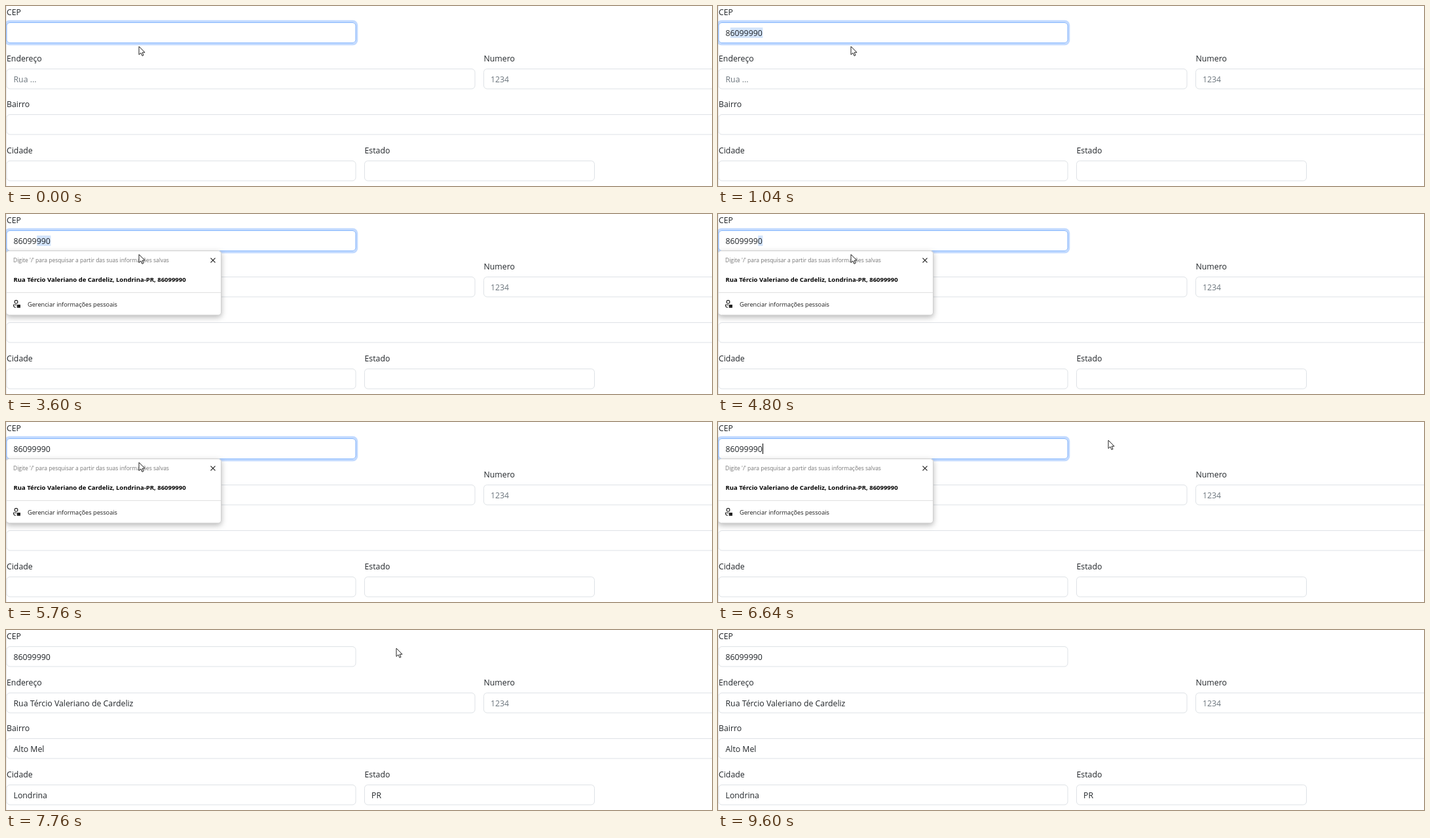
Write an HTML page that moves like this. It is 1078 px wide and 276 px high and loops after 9.68 s.

```html
<!DOCTYPE html>
<html lang="pt-BR">
<head>
<meta charset="utf-8">
<title>Busca de CEP</title>
<style>
  html, body { margin: 0; height: 100%; overflow: hidden; background: #fff; }
  svg { display: block; width: 100%; height: 100%; }
  text { font: 12.3px "Open Sans", "Noto Sans", sans-serif; fill: #212529; }
  .hint { fill: #6c757d; }
  .box { fill: #fff; stroke: #dee2e6; }
  #popup rect { fill: #fff; stroke: #d0d0d0; filter: drop-shadow(0 3px 4px rgba(0, 0, 0, .28)); }
  #popup .tip { font-size: 8.47px; fill: #767676; }
  #popup .saved { font-size: 9.5px; font-weight: 700; fill: #000; }
  #popup .manage { font-size: 9.2px; fill: #1b1b1b; }
</style>
</head>
<body>
<svg viewBox="0 0 1078 276">
  <path d="M.5 0V276" stroke="#e6e6e6"/>
  <g id="form"></g>
  <g id="focus">
    <rect x="-.6" y="23.4" width="536.2" height="35.2" rx="6" fill="none" stroke="#0d6efd" stroke-opacity=".25" stroke-width="3.4"/>
    <rect x="1" y="25.5" width="533" height="31" rx="5" fill="#fff" stroke="#86b7fe"/>
  </g>
  <rect id="selection" y="33" height="16" fill="#d3e4fa"/>
  <text id="cep" x="11.5" y="46"></text>
  <path id="caret" d="M68.5 33V49" stroke="#000"/>
  <g id="popup">
    <rect x=".5" y="56.5" width="328" height="98.5" rx="4"/>
    <text class="tip" x="11" y="74">Digite '/' para pesquisar a partir das suas informações salvas</text>
    <path d="M312.5 67.5l7 7m0-7l-7 7" stroke="#333" stroke-width="1.1"/>
    <text class="saved" x="11.5" y="104"></text>
    <path d="M1 120.5H328" stroke="#e0e0e0"/>
    <g fill="none" stroke="#222" stroke-width="1.1">
      <circle cx="15.5" cy="134.8" r="2.4"/>
      <path d="M15 143.3c-3 0-3.6-1.4-3.6-4h4.6"/>
      <path d="M17.2 139.6h4.2v3.6h-4.2z" fill="#222"/>
    </g>
    <text class="manage" x="33" y="142">Gerenciar informações pessoais</text>
  </g>
  <path id="mouse" d="M0 0V12.6L3 9.9L5 14.4L7 13.5L5.1 9.2H9Z" fill="#fff" stroke="#222" stroke-linejoin="round"/>
</svg>
<script>
const LOOP = 9680, STEP = 80;
const CEP = "86099990", STREET = "Rua Tércio Valeriano de Cardeliz";
const FIRST_KEY = 880, KEY_GAP = 600, LAST_KEY = FIRST_KEY + 7 * KEY_GAP;
const POPUP_OPEN = 1200, BLUR = 7200, FILL = 7360;
const $ = id => document.getElementById(id);
const show = (id, on) => $(id).style.display = on ? "" : "none";
const clamp = v => Math.min(1, Math.max(0, v));

// label, x, top of box, width, placeholder, value after lookup
const fields = [
  ["CEP", 1, 25.5, 533, "", ""],
  ["Endereço", 1, 96.5, 715, "Rua ...", STREET],
  ["Numero", 729.5, 96.5, 370, "1234", ""],
  ["Bairro", 1, 166.5, 1100, "", "Alto Mel"],
  ["Cidade", 1, 237.5, 533, "", "Londrina"],
  ["Estado", 547.5, 237.5, 351, "", "PR"]
];
$("form").innerHTML = fields.map(([label, x, y, w]) =>
  `<text x="${x}" y="${y - 12}">${label}</text>
   <rect class="box" x="${x}" y="${y}" width="${w}" height="30.5" rx="5"/>
   <text class="value" x="${x + 10.5}" y="${y + 20}"></text>`).join("");
const values = document.querySelectorAll(".value");
document.querySelector(".saved").textContent = `${STREET}, Londrina-PR, ${CEP}`;

function mouseAt(t) {
  const ease = p => p * p * (3 - 2 * p);
  const a = ease(clamp((t - 6240) / 360)), b = clamp((t - 8720) / 400);
  return [203 + 393 * a + 60 * b * b, 62 - 34 * a - 48 * b * b];
}

function draw(t) {
  const typed = t < FIRST_KEY ? 0 : Math.min(8, 1 + Math.floor((t - FIRST_KEY) / KEY_GAP));
  const focused = t < BLUR;
  $("cep").textContent = typed ? CEP : "";
  const start = 11.8 + 7.06 * typed;
  $("selection").setAttribute("x", start);
  $("selection").setAttribute("width", Math.max(0, 68.4 - start));
  show("selection", typed > 0 && typed < 8);

  const blink = typed ? (t - LAST_KEY) % 1060 < 530 : t >= 320;
  show("caret", focused && blink && (!typed || typed === 8));
  $("caret").setAttribute("transform", `translate(${typed ? 0 : -57})`);

  $("focus").style.opacity = 1 - clamp((t - BLUR) / 150);
  show("popup", t >= POPUP_OPEN && focused);

  fields.forEach(([, , , , hint, value], i) => {
    const filled = t >= FILL && value;
    values[i].textContent = filled ? value : hint;
    values[i].classList.toggle("hint", !filled);
  });

  $("mouse").setAttribute("transform", `translate(${mouseAt(t)})`);
}

const begin = performance.now();
function frame() {
  const t = (performance.now() - begin) % LOOP;
  draw(Math.floor(t / STEP) * STEP);
  requestAnimationFrame(frame);
}
frame();
</script>
</body>
</html>
```
